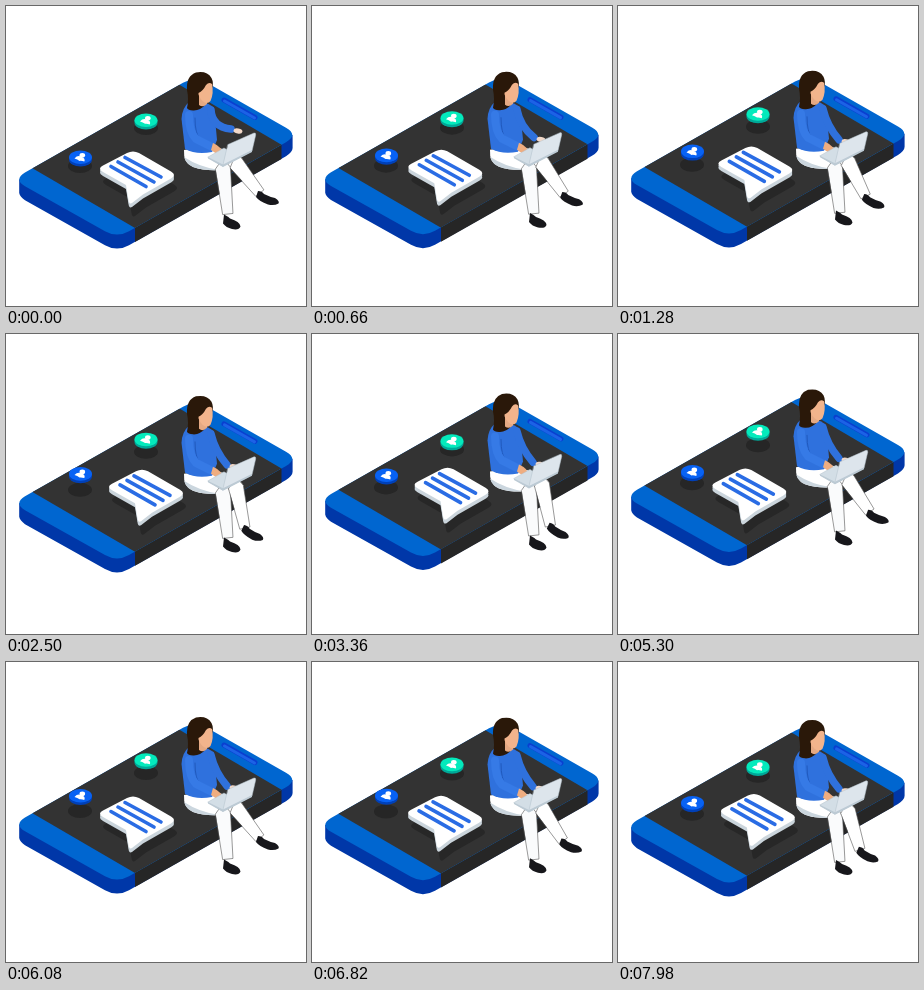
An HTML page that plays this animation: 300x300 px, repeating every 8 s.

```html
<!DOCTYPE html>
<html lang="en">
<head>
<meta charset="utf-8">
<title>Messaging on a floating phone</title>
<style>
  html, body { margin: 0; width: 100%; height: 100%; overflow: hidden; background: #fff; }
  svg { display: block; width: 100vw; height: 100vh; }
</style>
</head>
<body>
<svg viewBox="0 0 300 300">
  <defs>
    <path id="slab" d="M19 166.5 L177 76.8 Q189 70 201 76.8 L280 121.8 Q292.5 129 280 136.2 L123 225.2 Q111 232 99 225.2 L19 180.3 Q7.5 173.5 19 166.5Z"/>
    <clipPath id="face"><use href="#slab"/></clipPath>
    <path id="balloon" d="M97 159.5 L121 147 Q127 144 133 147 L165 165.5 Q171 169 165 172.5 L137 188.5 L126 197 Q123 198.5 122.5 194 L120 179 L97 166 Q91 162.5 97 159.5Z"/>
    <g id="person" fill="#fff">
      <ellipse cx="1.8" cy="-2" rx="2.8" ry="2.3"/>
      <path d="M-6 1.2 Q-3 -2.4 1 -.6 Q5.3 1.2 3.8 4.2 Q1 3.2 -1 3.6 Q-3 2 -6 1.2Z"/>
    </g>
  </defs>

  <g id="scene">
    <!-- Phone: side wall, then top face -->
    <path fill="#0037a8" d="M13.2 173.5 V187 Q14 191 19 194.3 L99 239.2 Q111 246 123 239.2 L280 150.2 Q286.6 146 286.6 142 V129Z"/>
    <path fill="#262626" d="M129 215 L275.5 131 V153 L129 236Z"/>
    <use href="#slab" fill="#0066d0"/>
    <path clip-path="url(#face)" fill="#333" d="M26 162 L173 78.5 L275.5 138.7 L129 222Z"/>
    <path d="M218 94 L249 111.5" stroke="#0a3fd0" stroke-width="5" stroke-linecap="round"/>
    <path d="M218.5 95 L248.5 112" stroke="#1c62e6" stroke-width="3" stroke-linecap="round"/>

    <g fill="#262626">
      <ellipse cx="74" cy="160" rx="12" ry="7"/>
      <ellipse cx="140" cy="122" rx="12" ry="7"/>
    </g>
    <g id="blue">
      <path fill="#0040b8" d="M-11.5 0 V2.5 A11.5 6.8 0 0 0 11.5 2.5 V0Z"/>
      <ellipse rx="11.5" ry="6.8" fill="#0862f4"/>
      <use href="#person"/>
    </g>
    <g id="green">
      <path fill="#00a898" d="M-11.5 0 V2.5 A11.5 6.8 0 0 0 11.5 2.5 V0Z"/>
      <ellipse rx="11.5" ry="6.8" fill="#04eabc"/>
      <use href="#person"/>
    </g>

    <g id="message">
      <use href="#balloon" x="3" y="13" fill="#272727"/>
      <use href="#balloon" y="4" fill="#cbd5dc"/>
      <use href="#balloon" y="2" fill="#cbd5dc"/>
      <use href="#balloon" fill="#fff"/>
      <path d="M119 151.5 L155 171 M112 156 L148 176 M105 160.5 L140 180.5" stroke="#2a6ce4" stroke-width="3.6" stroke-linecap="round"/>
    </g>

    <!-- Woman -->
    <g id="woman" stroke-linejoin="round" stroke-linecap="round">
      <path fill="#fff" d="M178 144 Q177 157 187 161 Q199 165 213 164 L236 159 L232 147 L205 140Z"/>
      <path fill="#cbd6de" d="M178 151 Q180 158 187 161 Q199 165 213 164 Q193 161 178 151Z"/>
      <path id="leftLeg" fill="#fafbfc" stroke="#555" stroke-width=".6"/>
      <path id="rightLeg" fill="#fff" stroke="#555" stroke-width=".6"/>
      <path id="leftShoe" fill="#17171b" d="M-8 -7 Q-4 -5 -2 -3 Q8 0 8.5 5 Q7 9 0 7.5 Q-6 6 -9 2Z"/>
      <path id="rightShoe" fill="#17171b" d="M-9 -7 Q-5 -7 -3 -4 Q3 -1 8 0 Q13 3 11.5 5.5 Q7 8 1 6.5 Q-8 3 -11 -1Z"/>

      <path fill="#2f71dd" d="M183 96 Q176 102 175.5 113 L179 143 Q190 149 206 146 L211 134 L208 102 Q203 97 196 96Z"/>
      <path id="rightArm" fill="none" stroke="#2f71dd" stroke-width="7.5"/>
      <ellipse id="rightHand" rx="4.5" ry="2.6" fill="#f2d8c8"/>
      <path fill="#2a1809" d="M181 102 Q183 93 181 84 Q180 70 190 66.5 Q201 64.5 205.5 72 Q208 77 206 83 L200 98 Q194 105 187 104.5 Q182 104 181 102Z"/>
      <path fill="#e5a983" d="M193 89 L201 92 V98 Q197 102 193 99Z"/>
      <path fill="#f2b48c" d="M200 79 Q203 75.500 206 78 Q208 87 204.500 95 Q201 99 196.500 95 Q192 90 192.500 87 Q197 85 200 79Z"/>
      <path fill="none" stroke="#2059bd" stroke-width="1" d="M189 112 Q189 128 194 133 L207 143"/>
      <path fill="none" stroke="#367ae6" stroke-width="8" d="M183 109 Q183 126 190 133 L206 141"/>
      <path fill="#efad80" d="M207 137 Q216 141 217 148 Q213 150 205 144Z"/>

      <g stroke="#b4c2cd" stroke-width=".5">
        <path fill="#d3dee6" d="M202 151 L218 142 L232 150 L217 160Z"/>
        <path fill="#dde5ec" d="M222 138.5 L248 127 Q250 126.5 249.7 129 L246 145 L217 160Z"/>
      </g>
      <path fill="#bccad4" d="M202 151 L217 158.5 L246 144 V146 L217 161 L202 152.5Z"/>
    </g>
  </g>
</svg>
<script>
const LOOP = 8000;
const el = id => document.getElementById(id);
const mix = (a, b, k) => a + (b - a) * k;
const wave = (t, period) => Math.cos(2 * Math.PI * t / period);
const ease = (t, from, to) => {
  const k = Math.min(1, Math.max(0, (t - from) / (to - from)));
  return k * k * (3 - 2 * k);
};
const move = (id, x, y, turn = 0) =>
  el(id).setAttribute('transform', `translate(${x} ${y}) rotate(${turn})`);

// Tapered trouser leg from knee to ankle.
function leg(id, kneeX, kneeY, ankleX, ankleY) {
  const length = Math.hypot(ankleX - kneeX, ankleY - kneeY);
  const nx = (ankleY - kneeY) / length, ny = (kneeX - ankleX) / length;
  const at = (x, y, half) => `${x + nx * half} ${y + ny * half}`;
  el(id).setAttribute('d',
    `M${at(kneeX, kneeY, -7.5)} Q${kneeX} ${kneeY - 13} ${at(kneeX, kneeY, 7.5)}` +
    `L${at(ankleX, ankleY, 5)} L${at(ankleX, ankleY, -5)}Z`);
}

function draw(t) {
  move('scene', 0, -5.5 + 5.5 * wave(t, 11900));
  move('blue', 74.5, 147.5 + 3.8 * wave(t, 4400));
  move('green', 140, 111 + 3.2 * wave(t, 3700));

  const slide = ease(t, 0, 2000) - ease(t, 3000, 5600) + ease(t, 6250, 8100);
  move('message', 9 * slide, -5.5 * slide);

  const swing = (1 - wave(t, 6000)) / 2;
  const ankleX = mix(254, 238, swing), ankleY = mix(187, 199, swing);
  leg('leftLeg', 217, 162, 222, 208);
  leg('rightLeg', 230, 157, ankleX, ankleY);
  move('leftShoe', 226, 214 + 1.5 * wave(t, 3000));
  move('rightShoe', ankleX + 7, ankleY + 5, 8 * swing);

  const lift = 1 - ease(t, 0, 1000);
  const wristX = mix(221, 225, lift), wristY = mix(135, 123, lift);
  el('rightArm').setAttribute('d', `M205 104 Q${mix(209, 206, lift)} 121 ${wristX} ${wristY}`);
  move('rightHand', wristX + 7, wristY + 2, 10);
}

function frame() {
  draw(performance.now() % LOOP);
  requestAnimationFrame(frame);
}
frame();
</script>
</body>
</html>
```
